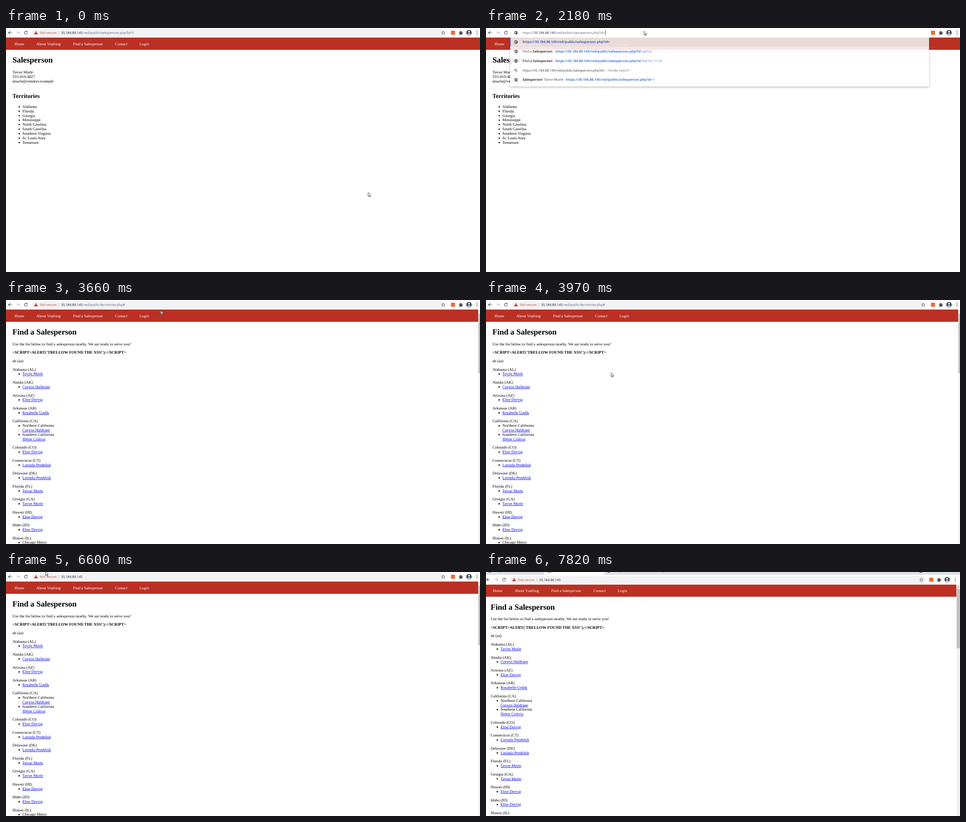
An HTML page for the animation above (8000 ms loop, 1042x537 px).

```html
<!DOCTYPE html>
<html lang="en">
<head>
<meta charset="utf-8">
<title>Salesperson directory</title>
<style>
  html, body { margin: 0; width: 100%; height: 100%; overflow: hidden; background: #fff; }
  svg { display: block; width: 1042px; height: 537px; }
  text { text-rendering: geometricPrecision; white-space: pre; }
  .page { font: 8.75px "Liberation Serif", "Times New Roman", serif; fill: #000; }
  .page .h1 { font-size: 17.5px; font-weight: bold; }
  .page .h2 { font-size: 13.1px; font-weight: bold; }
  .page .nav { font-size: 8.65px; fill: #fff; }
  .page .link { fill: #00e; text-decoration: underline; }
  .ui { font: 7.25px "Open Sans", "Noto Sans", sans-serif; fill: #5f6368; }
  .ui .tab { font-size: 6.5px; }
  .b { font-weight: bold; }
  .dark { fill: #202124; }
  .blue { fill: #3367d6; }
  .warn { fill: #c5432e; }
  .strike { text-decoration: line-through; }
  .line { fill: none; stroke: #4a4d51; stroke-width: 1.1; }
</style>
</head>
<body>
<svg id="stage" viewBox="0 0 1042 537"></svg>
<script>
const LOOP = 8000, TICK = 77.5;
const LINE = 9.85, GAP = 8.75;
const AGENT = { name: 'Tavon Murle', phone: '555-010-4827', mail: 'tmurle@vendors.example' };
const [COR, ELI, LOR] = ['Corwin Haldrane', 'Elise Dorvig', 'Lorinda Pemblish'];

// pointer moves: first step, last step, x and y reached
const REST = [796, 362];
const MOVES = [
  [70, 550, 346, 8], [870, 870, 345, 6], [1170, 1170, 347.5, 7], [3660, 3970, 275, 160],
  [4120, 4510, 149, 61], [4660, 5050, 81, -3], [5290, 5290, 81, -5], [5520, 5600, 81.5, 1],
  [5670, 5670, 81, -3], [5900, 5900, 74.5, -3], [6050, 6050, 81, -3], [6220, 6300, 87, 1],
  [6370, 6450, 81, -4], [6600, 6600, 87, -1], [6920, 7080, 100, 1], [7150, 7540, 84, -4],
  [7740, 7740, 84, -20]
];
const PAN = [[0, 0, 0], [7740, -2, 3], [7820, -4, 6.5]];
const FADE = [[0, 0], [2180, .88], [2260, 1], [2730, .41], [2820, 0]];

const text = (x, y, s, cls = '') => `<text x="${x}" y="${y}" class="${cls}">${s}</text>`;
const span = (cls, s) => `<tspan class="${cls}">${s}</tspan>`;
const rect = (x, y, w, h, fill, more = '') =>
  `<rect x="${x}" y="${y}" width="${w}" height="${h}" fill="${fill}" ${more}/>`;
const use = (id, x, y) => `<use href="#${id}" x="${x}" y="${y}"/>`;
// on: spans of time such as "0-700 900-1200"
const layer = (on, ...parts) => `<g data-on="${on}">${parts.join('')}</g>`;

const HOST = '35.184.88.145', PATH = '/red/public/salesperson.php?id';
const SITE = 'https://' + HOST + PATH;
const url = path => span('dark', HOST) + path;

const defs = `<defs>
  <g id="globe"><circle r="3.8" fill="#55585c"/>
    <path d="M-2.6-1.2L-.4.2-1 2.6-2.8.8ZM-.2-2.7L2-2 .8-.6-.6-1Z" fill="#fff"/></g>
  <g id="search" class="line"><circle cx="-.8" cy="-.8" r="2.1"/><path d="M.8.8L3 3"/></g>
  <g id="cross" class="line"><path d="M-2.7-2.7L2.7 2.7M2.7-2.7L-2.7 2.7"/></g>
  <g id="grid" class="line"><path d="M-1.5-3.6V3.6M1.5-3.6V3.6M-3.6-1.5H3.6M-3.6 1.5H3.6"/></g>
  <filter id="shadow" x="-3%" y="-20%" width="106%" height="150%">
    <feDropShadow dx="0" dy="2" stdDeviation="2.6" flood-opacity=".32"/></filter>
</defs>`;

function nav(width) {
  const links = [[19, 'Home'], [66.7, 'About Vunlitog'], [147.5, 'Find a Salesperson'],
    [240, 'Contact'], [293.6, 'Login']];
  return rect(0, 21, width, 27, '#bb3023') +
    links.map(([x, s]) => text(x, 37.9, s, 'nav')).join('');
}

function profile() {
  const areas = ['Alabama', 'Florida', 'Georgia', 'Mississippi', 'North Carolina',
    'South Carolina', 'Southern Virginia', 'St. Louis Area', 'Tennessee'];
  return nav(1050) + text(14.2, 76, 'Salesperson', 'h1') +
    [AGENT.name, AGENT.phone, AGENT.mail].map((s, i) => text(14.2, 99.9 + i * LINE, s)).join('') +
    text(14.2, 154, 'Territories', 'h2') +
    areas.map((s, i) => {
      const y = 175.8 + i * LINE;
      return `<circle cx="29" cy="${y - 2.4}" r="1.45"/>` + text(36.1, y, s);
    }).join('');
}

function directory() {
  const states = [
    ['Alabama (AL)', AGENT.name], ['Alaska (AK)', COR], ['Arizona (AZ)', ELI],
    ['Arkansas (AR)', 'Rosabelle Undik'],
    ['California (CA)', '*Northern California', COR, '*Southern California', 'Hettie Crolvin'],
    ['Colorado (CO)', ELI], ['Connecticut (CT)', LOR], ['Delaware (DE)', LOR],
    ['Florida (FL)', AGENT.name], ['Georgia (GA)', AGENT.name], ['Hawaii (HI)', ELI],
    ['Idaho (ID)', ELI], ['Illinois (IL)', '*Chicago Metro']
  ];
  let y = 155.6, out = '';
  for (const [state, ...rows] of states) {
    out += text(14.2, y, state);
    rows.forEach((row, i) => {
      y += LINE;
      const area = row[0] === '*';
      if (area || i === 0) out += rect(27.6, y - 3.8, 2.7, 2.7, '#000');
      out += text(36.1, y, area ? row.slice(1) : row, area ? '' : 'link');
    });
    y += LINE + GAP;
  }
  return nav(1038) + text(14.2, 76, 'Find a Salesperson', 'h1') +
    text(14.2, 99.8, 'Use the list below to find a salesperson nearby. We are ready to serve you!') +
    text(14.2, 118.2, "&lt;SCRIPT&gt;ALERT('TRELLOW FOUND THE XSS!');&lt;/SCRIPT&gt;", 'b') +
    text(14.2, 136.8, 'ab (aa)') + out +
    rect(1038, 21, 9.3, 530, '#f1f1f1') + rect(1038.6, 30.3, 8.1, 131, '#c1c1c1') +
    '<path d="M1040.6 26.8h4l-2-2.4z" fill="#505050"/>';
}

function tabs() {
  const title = (x, s) => use('globe', x, -8.9) + text(x + 8, -7, s, 'tab');
  return rect(0, -20, 1050, 20, '#dee1e6') + rect(132, -20, 132, 20, '#fff') +
    title(12, 'Salesperson') + title(143, 'Find a Salesperson') + title(274, 'Salesperson') +
    rect(393.6, -14, .6, 10, '#9a9da1') + '<circle cx="960" cy="-8" r="3.6" fill="#5f6368"/>';
}

function starPath(cx, cy, r) {
  const points = Array.from({ length: 10 }, (_, i) => {
    const a = i * Math.PI / 5, d = i % 2 ? r * .45 : r;
    return [cx + d * Math.sin(a), cy - d * Math.cos(a)].map(v => v.toFixed(2));
  });
  return `<path class="line" style="stroke-width:.8" d="M${points.join('L')}Z"/>`;
}

function icons() {
  return '<path class="line" d="M12.8 10.3H5.6M9 6.8L5.4 10.3 9 13.9"/>' +
    '<path class="line" style="stroke:#babcbe" d="M22.2 10.3h7.2M26 6.8l3.6 3.5L26 13.9"/>' +
    layer('0-2730 3660-8000',
      '<path class="line" d="M46.3 8.2A3.4 3.4 0 1 0 47 11.2"/><path d="M47.4 6.2v3.4H44z" fill="#4a4d51"/>') +
    layer('2730-3660', use('cross', 43.6, 10.4)) +
    rect(978.2, 6, 9, 9, '#f26b30', 'rx="1"') +
    '<g fill="#505357">' + rect(996.4, 8, 6.3, 6.7, '#505357', 'rx=".6"') +
    '<circle cx="999.8" cy="7.8" r="1.4"/><circle cx="1003" cy="11.4" r="1.4"/></g>' +
    '<circle cx="1017.8" cy="10.3" r="6" fill="#4b4e5a"/><circle cx="1017.8" cy="8.4" r="1.9" fill="#fff"/>' +
    '<path d="M1014 13.6q3.8-3.4 7.6 0-3.8 3-7.6 0z" fill="#fff"/>' +
    [7, 10.4, 13.8].map(y => `<circle cx="1035.6" cy="${y}" r=".95" fill="#4a4d51"/>`).join('');
}

function toolbar() {
  const pill = (fill, more = '') => rect(56, 2.2, 914, 16.4, fill, `rx="8.2" ${more}`);
  const caret = x => rect(x, 4.5, .8, 10.8, '#202124');
  const warning = '<path d="M65.8 6.4L70 13.8H61.6Z" fill="#c5221f"/>' +
    rect(65.4, 9, .9, 2.3, '#fff') + rect(65.4, 12, .9, .8, '#fff') +
    text(74.5, 13, 'Not secure', 'warn') + rect(115.5, 6, .6, 9, '#b4b7bb');
  const info = '<circle class="line" style="stroke-width:.9" cx="65.8" cy="10.4" r="3.4"/>' +
    rect(65.4, 9.8, .9, 2.6, '#4a4d51') + rect(65.4, 8.3, .9, .9, '#4a4d51');
  return rect(0, 0, 1050, 21, '#fff') + icons() +
    layer('0-550 2730-4740 4970-8000', pill('#f1f3f4')) +
    layer('550-700 4740-4970', pill('#e8eaed')) +
    layer('700-2180', pill('#fff', 'stroke="#a9c5f5" stroke-width="1.2"')) +
    layer('0-2180 3660-8000', warning) +
    layer('0-700', text(121, 13, url(PATH + '=1'))) +
    layer('870-1330', rect(121, 4.6, 186, 11.4, '#a8c7f9'),
      text(121, 13, span('strike', 'https') + '://' + HOST + PATH + '=1', 'dark')) +
    layer('700-870 1330-2180',
      text(121, 13, span('warn strike', 'https') + '://' + url(PATH + '=1'))) +
    layer('1330-1800', caret(307.2)) +
    layer('2180-2730', rect(53, 0, 921, 21, '#fff'), use('globe', 65.8, 10.4)) +
    layer('2180-2410', text(80.5, 13, 'https://' + url(PATH + '=')), caret(262)) +
    layer('2410-2730', text(80.5, 13, 'https://' + url(PATH + "='or 1=1;#")), caret(293.4)) +
    layer('2730-3660', info, text(74.5, 13, url(PATH + '=%27or%201=1;#'))) +
    layer('3660-4820', text(121, 13, url('/red/public/territories.php#'))) +
    layer('4820-8000', text(121, 13, HOST, 'dark')) +
    layer('0-2180 2730-8000', starPath(961, 10.6, 4)) +
    layer('700-2180 2730-3660', use('grid', 943.4, 10.4));
}

function popup(rows, height) {
  const row = ([icon, s], i) =>
    use(icon, 65.8, 30.9 + i * 20.75) + text(80.5, 33.4 + i * 20.75, s);
  return `<path d="M53 20.6H974V${height - 4}q0 4-4 4H57q-4 0-4-4z" fill="#fff" filter="url(#shadow)"/>` +
    rect(53, 20.6, 921, 20.6, '#f1f3f4') + rect(52.4, 20.6, 1.8, 20.6, '#3b78e7') +
    rows.map(row).join('');
}

function suggestions() {
  const found = span('dark', 'Find a ' + span('b', 'Salesperson')) + ' - ';
  const hit = tail => span('blue', span('b', SITE) + tail);
  const query = s => span('dark', SITE + s) + ' - Fendle Search';
  const first = [
    ['globe', span('b blue', SITE + '=')],
    ['globe', found + hit('=admin')],
    ['globe', found + hit('=%27or 1=1;#')],
    ['search', query('=')],
    ['globe', span('dark', span('b', 'Salesperson') + ': ' + AGENT.name) + ' - ' + hit('=1')]
  ];
  const second = [
    ['globe', found + span('b blue', SITE + '=%27or 1=1;#')],
    ['search', query("='or 1=1;#")]
  ];
  return '<g id="popup">' + layer('2180-2410', popup(first, 128.5)) +
    layer('2410-2820', popup(second, 66.8), use('cross', 963, 30.7)) + '</g>';
}

const stage = document.getElementById('stage');
stage.innerHTML = defs + '<g id="screen">' +
  `<g class="page">${layer('0-3660', profile())}${layer('3660-8000', directory())}</g>` +
  `<g class="ui">${suggestions()}${tabs()}${toolbar()}</g>` +
  '<path id="pointer" d="M0 0V8.6L2 6.8 3.4 10 4.8 9.4 3.5 6.3H6Z" fill="#fff" stroke="#222" stroke-width=".8"/></g>';

const byId = id => document.getElementById(id);
const screenGroup = byId('screen'), pointer = byId('pointer'), list = byId('popup');
const layers = [...stage.querySelectorAll('[data-on]')].map(el => ({
  el, spans: el.dataset.on.split(' ').map(s => s.split('-').map(Number))
}));
const at = (steps, t) => steps.findLast(s => s[0] <= t).slice(1);

function pointerAt(t) {
  let [px, py] = REST;
  for (const [from, to, x, y] of MOVES) {
    if (t < from) break;
    const count = Math.round((to - from) / TICK) + 1;
    const gap = count > 1 ? (to - from) / (count - 1) : TICK;
    const p = Math.min(1, (Math.floor((t - from) / gap) + 1) / count);
    const e = p * p * (3 - 2 * p);
    px += (x - px) * e;
    py += (y - py) * e;
  }
  return [px, py];
}

function draw(t) {
  for (const { el, spans } of layers)
    el.style.display = spans.some(([a, b]) => t >= a && t < b) ? '' : 'none';
  screenGroup.setAttribute('transform', `translate(${at(PAN, t)})`);
  pointer.setAttribute('transform', `translate(${pointerAt(t)})`);
  list.setAttribute('opacity', at(FADE, t)[0]);
}

const start = performance.now();
function tick() {
  draw((performance.now() - start) % LOOP);
  requestAnimationFrame(tick);
}
tick();
</script>
</body>
</html>
```
